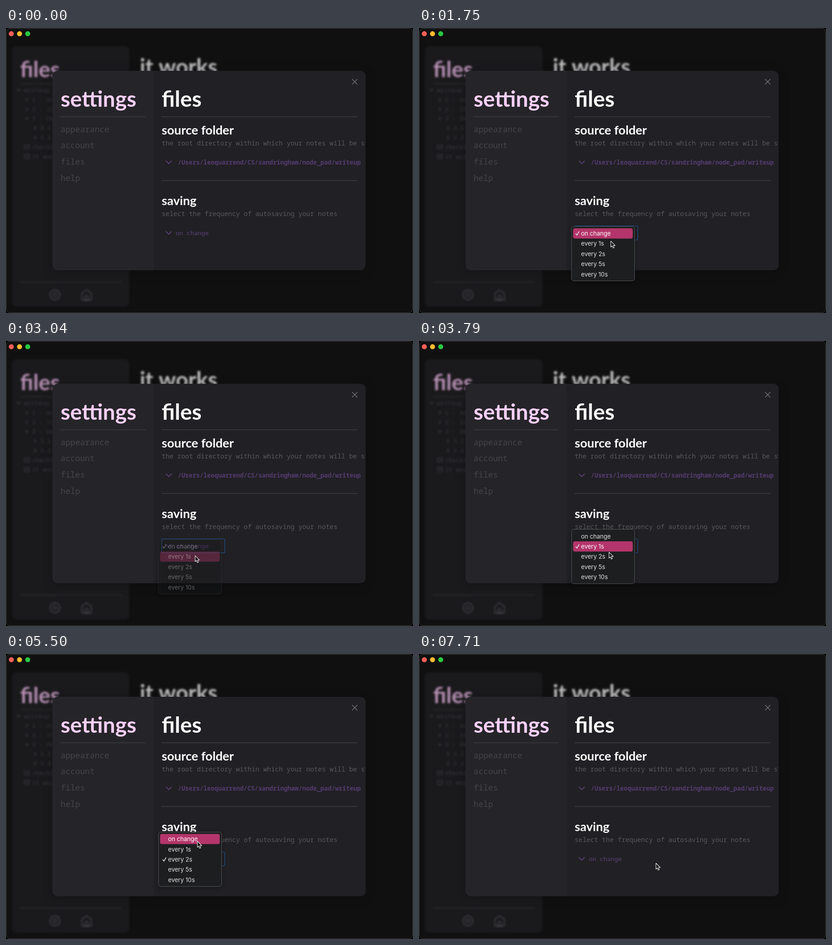
An HTML page with a canvas that plays this animation: 894 px wide and 626 px high, repeating every 7.75 s.

```html
<!DOCTYPE html>
<html lang="en">
<head>
<meta charset="utf-8">
<title>settings</title>
<style>
html, body { margin: 0; width: 100%; height: 100%; overflow: hidden; background: #000; }
canvas { display: block; }
</style>
</head>
<body>
<canvas id="stage" width="894" height="626"></canvas>
<script>
const W = 894, H = 626, LOOP = 7750;
const HEAD = 'Lato, "Open Sans", sans-serif';
const MONO = '"Noto Sans Mono", "DejaVu Sans Mono", monospace';
const UI = 'Inter, Roboto, sans-serif';
const OPTIONS = ['on change', 'every 1s', 'every 2s', 'every 5s', 'every 10s'];
const ROW = 22.4, FADE = 400, HOVER_LAG = 100, BLUR_AT = 6700;

// Pointer stops: arrive, leave, x, y
const STOPS = [
  [220, 220, 456, 640],
  [950, 1500, 425, 453],
  [2100, 2500, 414, 492],
  [2700, 2950, 415, 476],
  [3250, 3550, 415, 453],
  [4050, 4250, 419, 475],
  [4500, 4900, 420, 453],
  [5400, 6010, 420, 411],
  [6330, LOOP, 520, 459]
];

// Each menu opens on the current value; the row under the pointer becomes the next
const MENUS = [[1200, 2790], [3400, 4140], [4660, 5655]].map(([open, pick]) => ({ open, pick }));
let current = 0;
for (const m of MENUS) {
  m.sel = current;
  m.top = 436 - current * ROW;
  m.next = current = rowAt(m, m.pick);
}

function pointerAt(t) {
  const i = STOPS.findIndex(s => t < s[1]);
  if (i < 1) return null;
  const [, from, x0, y0] = STOPS[i - 1], [to, , x1, y1] = STOPS[i];
  const p = Math.min(1, (t - from) / (to - from)), e = p * p * (3 - 2 * p);
  return [x0 + (x1 - x0) * e, y0 + (y1 - y0) * e];
}

function rowAt(m, t) {
  const y = pointerAt(Math.min(t, m.pick) - HOVER_LAG)[1];
  return Math.max(0, Math.min(OPTIONS.length - 1, Math.floor((y - m.top - 4) / ROW)));
}

function text(c, str, x, y, size, color, family, weight = 400) {
  c.font = `${weight} ${size}px ${family}`;
  c.fillStyle = color;
  c.fillText(str, x, y);
}

function box(c, x, y, w, h, r, fill, stroke, width = 1) {
  c.beginPath();
  c.roundRect(x, y, w, h, r);
  if (fill) { c.fillStyle = fill; c.fill(); }
  if (stroke) { c.strokeStyle = stroke; c.lineWidth = width; c.stroke(); }
}

function line(c, points, color, width) {
  c.beginPath();
  points.forEach(([x, y]) => c.lineTo(x, y));
  c.strokeStyle = color;
  c.lineWidth = width;
  c.lineCap = c.lineJoin = 'round';
  c.stroke();
}

function rule(c, x0, x1, y, color = '#3d3c40', width = 1.6) {
  line(c, [[x0, y], [x1, y]], color, width);
}

function circle(c, x, y, r) {
  c.beginPath();
  c.arc(x, y, r, 0, Math.PI * 2);
}

function chevron(c, x, y, s, color, width, turn = 0) {
  c.save();
  c.translate(x, y);
  c.rotate(turn);
  line(c, [[-s, -s / 2], [0, s / 2], [s, -s / 2]], color, width);
  c.restore();
}

function drawTree(c) {
  const ink = '#3a393d';
  const rows = [
    ['writeup', 0, 'open'], ['1 - Analysis', 1, 'shut'], ['2 - Iterations', 1, 'shut'],
    ['3 - Design', 1, 'open'], ['3.1', 2, 'shut'], ['3.2', 2, 'shut'],
    ['checklist', 1, 'note'], ['it works', 1, 'note']
  ];
  rows.forEach(([label, depth, icon], i) => {
    const x = 28 + depth * 18, y = 136.5 + i * 20.8;
    if (icon === 'note') {
      box(c, x - 5.5, y - 4.5, 11, 9, 1, null, ink, 1.6);
      rule(c, x - 4, x + 4, y, ink, 1.4);
    } else {
      chevron(c, x, y, 3.2, ink, 2, icon === 'shut' ? -Math.PI / 2 : 0);
    }
    text(c, label, x + 11, y + 4.5, 13.4, ink, MONO, 500);
  });
}

function drawIcons(c) {
  const ink = '#48474b';
  const gear = Array.from({ length: 65 }, (_, i) => {
    const a = i / 32 * Math.PI, r = 10.6 + Math.cos(a * 8);
    return [107.5 + r * Math.cos(a), 586 + r * Math.sin(a)];
  });
  line(c, gear, ink, 1.9);
  circle(c, 107.5, 586, 4);
  c.stroke();
  const house = (w, roof, eave, floor) => line(c,
    [[177 - w, floor], [177 - w, eave], [177, roof], [177 + w, eave], [177 + w, floor], [177 - w, floor]], ink, 1.9);
  house(10.5, 575, 583, 597.5);
  house(4, 587, 590, 597.5);
}

function drawWindow(c) {
  c.fillStyle = '#000';
  c.fillRect(0, 0, W, H);
  box(c, 0.5, 0.5, W - 1, H - 1, 9, '#101011', '#3c3c3e');
  c.filter = 'blur(2px)';
  box(c, 13, 40, 258, 572, 9, '#1a191c');
  text(c, 'files', 31, 108, 48, '#b690b3', HEAD, 700);
  text(c, 'it works', 294, 102, 47.5, '#c2c2c3', HEAD, 700);
  rule(c, 31, 255, 122, '#2b2a2d', 1.8);
  rule(c, 31, 254, 558, '#2d2c30', 2);
  drawTree(c);
  drawIcons(c);
  c.filter = 'none';
  ['#fe5f57', '#febc2e', '#28c840'].forEach((color, i) => {
    circle(c, 11.7 + i * 18, 12.6, 5.5);
    c.fillStyle = color;
    c.fill();
  });
}

function drawModal(c) {
  c.save();
  c.shadowColor = 'rgba(0,0,0,.2)';
  c.shadowBlur = 24;
  c.shadowOffsetY = 4;
  box(c, 102, 94, 688, 438, 12, '#212024');
  c.restore();

  c.save();
  c.clip();
  c.fillStyle = '#252428';
  c.fillRect(102, 94, 222, 438);
  text(c, 'settings', 120, 173, 48, '#fbd0fa', HEAD, 700);
  text(c, 'files', 342, 173, 48, '#fff', HEAD, 700);
  rule(c, 120, 306, 195);
  rule(c, 342, 772, 195);
  rule(c, 342, 772, 335);
  ['appearance', 'account', 'files', 'help'].forEach((s, i) =>
    text(c, s, 120, 228.5 + i * 35.7, 17.8, '#454448', MONO));

  const section = (title, about, y) => {
    text(c, title, 342, y, 27.2, '#fff', HEAD, 700);
    text(c, about, 342, y + 24, 14.3, '#59585c', MONO);
    chevron(c, 357.5, y + 61, 5.8, '#5b417a', 1.9);
  };
  section('source folder', 'the root directory within which your notes will be stored', 234);
  section('saving', 'select the frequency of autosaving your notes', 389);
  text(c, '/Users/leoquarrend/CS/sandringham/node_pad/writeup', 377.5, 299.5, 13.4, '#543c71', MONO, 600);
  for (const d of [-5.5, 5.5]) line(c, [[766 - d, 112.5], [766 + d, 123.5]], '#78777b', 1.3);
  c.restore();
}

function drawSelect(c, t) {
  const done = MENUS.filter(m => t >= m.pick + FADE).pop();
  if (t >= MENUS[0].open && t < BLUR_AT) box(c, 342, 434.5, 138.5, 31, 3, null, '#24599a', 1.1);
  text(c, OPTIONS[done ? done.next : 0], 373, 454.5, 13.4, '#5a4178', MONO, 500);
}

function drawMenu(c, m, t) {
  if (t < m.open || t >= m.pick + FADE) return;
  const alpha = Math.min(1, 1 - (t - m.pick) / FADE);
  const row = rowAt(m, t);
  c.save();
  // the panel thins out faster than its labels
  c.globalAlpha = alpha ** 1.5;
  c.save();
  c.shadowColor = 'rgba(0,0,0,.35)';
  c.shadowBlur = 10;
  c.shadowOffsetY = 3;
  box(c, 335, m.top, 138.5, 119.5, 5, '#1d1e20');
  c.restore();
  box(c, 335, m.top, 138.5, 119.5, 5, null, '#57585a');
  c.globalAlpha = alpha;
  box(c, 338.5, m.top + 4 + row * ROW, 131, ROW, 4, '#b4356b');
  OPTIONS.forEach((s, i) => {
    const y = m.top + 15.2 + i * ROW;
    text(c, s, 356, y + 4.8, 13.1, i === row ? '#fff' : '#e2e2e3', UI);
    if (i === m.sel) line(c, [[344.5, y + 0.6], [347, y + 3.8], [351.5, y - 4]], '#f2f2f2', 1.5);
  });
  c.restore();
}

function drawPointer(c, t) {
  const p = pointerAt(t);
  if (!p) return;
  c.save();
  c.translate(p[0] + 0.5, p[1] + 0.5);
  c.beginPath();
  [[0, 0], [0, 13], [2.9, 10.3], [5, 15.2], [7.3, 14.2], [5.3, 9.5], [9.4, 9.5]]
    .forEach(([x, y]) => c.lineTo(x, y));
  c.closePath();
  c.fillStyle = '#0a0a0a';
  c.fill();
  c.strokeStyle = '#f4f4f4';
  c.lineWidth = 1.1;
  c.lineJoin = 'round';
  c.stroke();
  c.restore();
}

const stage = document.getElementById('stage').getContext('2d');
const base = document.createElement('canvas');
base.width = W;
base.height = H;
const still = base.getContext('2d');
drawWindow(still);
drawModal(still);

let start = null;
function loop(now) {
  if (start === null) start = now;
  const t = (now - start) % LOOP;
  stage.drawImage(base, 0, 0);
  drawSelect(stage, t);
  MENUS.forEach(m => drawMenu(stage, m, t));
  drawPointer(stage, t);
  requestAnimationFrame(loop);
}
requestAnimationFrame(loop);
</script>
</body>
</html>
```
